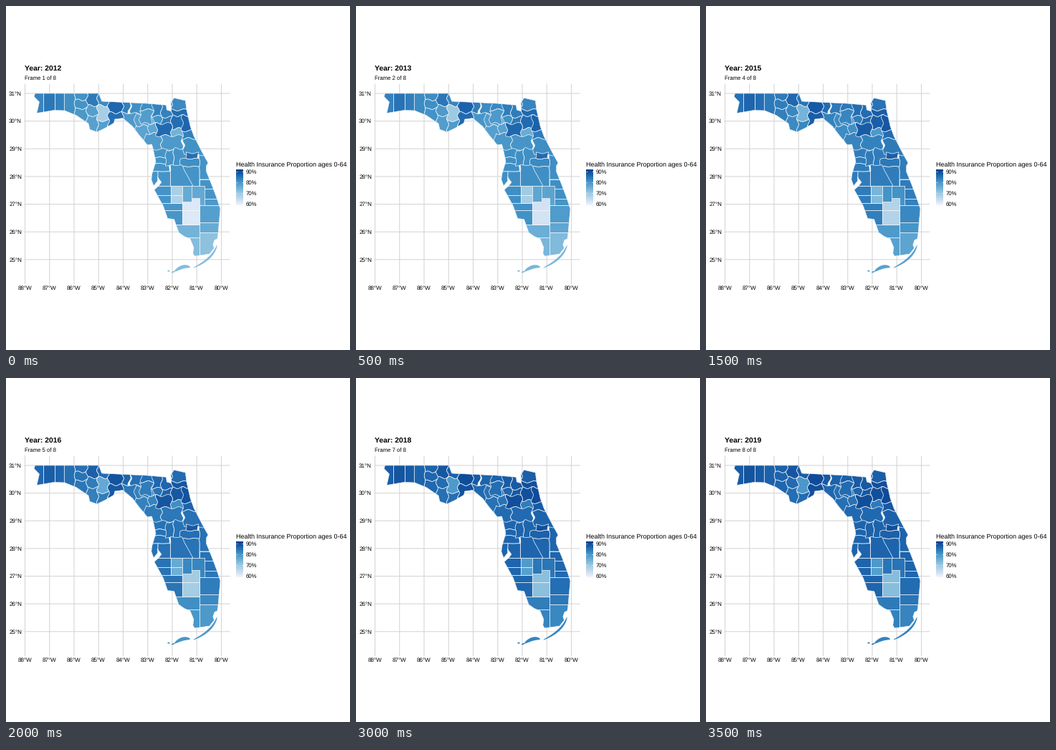
A matplotlib script for the animation above (4 s loop, 480 by 480 pixels).

```python
import numpy as np
import matplotlib.pyplot as plt
from matplotlib.animation import FuncAnimation
from matplotlib.colors import LinearSegmentedColormap, Normalize
from matplotlib.patches import Polygon
from matplotlib.path import Path

plt.rcParams["font.family"] = "Liberation Sans"
plt.rcParams["text.hinting"] = "none"

SIZE = 480
YEARS = range(2012, 2020)
EDGE = "#f4f8fc"
BLUES = LinearSegmentedColormap.from_list("blues", [
    "#eff3ff", "#c6dbef", "#9ecae1", "#6baed6", "#4292c6", "#2069b0", "#083d8d"])
NORM = Normalize(58.4, 91.4)

# Regional departures from the usual share: x, y, reach, percent
REGIONS = [
    (60, 140, 15, 4), (118, 128, 6, 4), (130, 160, 14, -4), (135, 150, 6, -13),
    (153, 146, 13, 10), (197, 170, 14, -5), (215, 142, 14, 3), (221, 172, 7, 6),
    (252, 160, 16, 7), (239, 180, 7, -9), (259, 209, 5, 5), (238, 263, 6, -18),
    (258, 285, 12, -24), (270, 335, 22, -12),
]

fig = plt.figure(figsize=(SIZE / 72, SIZE / 72), dpi=72, facecolor="white")
ax = fig.add_axes([0, 0, 1, 1])
ax.axis("off")
shapes = []


def points(*flat):
    return np.array(flat, float).reshape(-1, 2)


def lon_x(west):
    return 26.5 + 34.25 * (88 - west)


def lat_y(north):
    return 122 + 38.63 * (31 - north)


def label(x, y, text, size, **style):
    return ax.text(x, y, text, fontsize=size, va="baseline", **style)


def grid_line(x, y):
    ax.plot(x, y, color="#d3d3d3", lw=1, zorder=0, snap=False)


def first_share(x, y):
    return 80 + sum(gain * np.exp(-((x - cx) ** 2 + (y - cy) ** 2) / (2 * reach ** 2))
                    for cx, cy, reach, gain in REGIONS)


def add_area(corners, x, y, clip=True):
    patch = Polygon(corners, closed=True, ec=EDGE, lw=0.7 if clip else 0,
                    joinstyle="round", zorder=2 + 0.01 * len(shapes))
    ax.add_patch(patch)
    if clip:
        patch.set_clip_path(coast, ax.transData)
    start = first_share(x, y)
    shapes.append((patch, start, min(0.5 * (93 - start), 11)))


def meander(x, y):
    """River-like borders in the north, straight ones in the south and far west."""
    size = 1.4 * np.clip((235 - y) / 40, 0, 1) * np.clip((x - 85) / 20, 0, 1)
    return np.column_stack([x + size * np.sin(y / 2.4 + x / 9),
                            y + size * np.sin(x / 2.7 + y / 11)])


def stack(left, right, *cuts, lean=0):
    """Counties one below the other; later stacks cover earlier ones."""
    t = np.linspace(0, 1, 24)
    for top, bottom in zip(cuts, cuts[1:]):
        ring = points(left, top, right, top, right + lean, bottom, left, bottom, left, top)
        sides = [a + (b - a) * t[:, None] for a, b in zip(ring, ring[1:])]
        x, y = np.vstack(sides).T
        add_area(meander(x, y), (left + right) / 2, (top + bottom) / 2)


def island(start, bend, end, width):
    """Tapered ribbon along a quadratic curve."""
    t = np.linspace(0, 1, 30)[:, None]
    start, bend, end = map(np.array, (start, bend, end))
    mid = start * (1 - t) ** 2 + 2 * bend * t * (1 - t) + end * t ** 2
    along = np.gradient(mid, axis=0)
    side = along[:, ::-1] * [1, -1] / np.hypot(*along.T)[:, None]
    side = side * width / 2 * np.sin(np.pi * t) ** 0.5
    add_area(np.vstack([mid + side, (mid - side)[::-1]]), 250, 337, clip=False)


# Key points of the mainland, clockwise
north = points(
    40.5, 122, 129.5, 122, 133.7, 133, 197, 136, 223.5, 138.3, 224.3, 145, 230.8, 147,
    230, 135, 234.5, 128.3, 250.3, 132)
east = points(
    252, 145, 257.2, 168, 262.3, 182, 275, 206.5, 282, 219, 279.5, 223, 279.5, 231,
    287.3, 250, 294.2, 268.5, 299, 283, 296, 317, 294.8, 325, 291, 326.5, 288.8, 333,
    290.5, 338, 284, 346, 263.2, 349)
gulf = points(
    260.8, 345, 262, 337, 257, 325, 248.6, 321.4, 241, 316, 234.5, 297.5, 225.5, 296.5,
    219.5, 279.3, 207, 256.5, 213, 251, 217, 246, 211, 238, 212, 243.5, 206, 251,
    202.8, 242, 204, 233.5, 209, 217, 205.2, 199, 203.5, 193, 197, 193.5)
panhandle = points(
    187, 181.5, 176.7, 168, 163, 156.5, 151.7, 158, 150.5, 163.2, 139, 170, 127, 175.8,
    117, 172.3, 115, 164, 98, 152.5, 82, 146, 67, 145.4, 43, 149.5, 46.5, 134, 39.2, 126.5)
mainland = np.vstack([north, east, gulf, panhandle])
coast = Path(np.vstack([mainland, mainland[:1]]))

# Panhandle
for left, right in [(34, 52), (52, 67.6), (67.6, 81.3), (81.3, 96)]:
    stack(left, right, 118, 160)
stack(96, 113, 118, 131, 143, 172)
stack(113, 128, 118, 139, 153, 182)
stack(128, 143, 118, 139, 160, 182)
stack(143, 163, 118, 149, 168)
stack(163, 187, 149, 190)
stack(174, 190, 118, 150)
stack(163, 176, 118, 149, lean=-5)

# North
stack(189, 206, 118, 145, 165)
stack(180, 200, 151, 167, 198)
stack(187, 205, 145, 164, lean=-3)
stack(205, 217, 118, 154, 164)
stack(217, 231, 118, 155, 166)
stack(231, 262, 118, 145, 153)
stack(231, 250, 153, 171, 186)
stack(246, 270, 153, 174, 185)
stack(199, 210, 164, 178)
stack(194, 217, 178, 202)
stack(210, 231, 164, 181)
stack(217, 246, 181, 201)

# Centre
stack(198, 228, 200, 211.5, 220, 231)
stack(223, 234, 201, 223)
stack(234, 252, 199, 224)
stack(270, 305, 205, 242, 254.7, 268.6, 278, 302.4, 316.3, 352)
stack(248, 290, 185, 208)
stack(243, 270, 213, 224, 252)
stack(251, 268, 205, 213)
stack(198, 212, 231, 260)
stack(212, 229.6, 231, 251.3)

# South
stack(258, 277, 251, 278)
stack(198, 229.6, 251.3, 264, 275)
stack(198, 246.4, 275, 285, 305)
stack(229.6, 246.4, 251.3, 263.5, 275)
stack(229.6, 245, 222, 251.3, lean=16)
stack(230, 270, 304.5, 322.5, 352)
stack(246.4, 270, 268, 285, 304.5)
stack(246.4, 259, 251.3, 273)

island((294.5, 333.5), (289, 353), (261, 365.5), 2.8)
island((235, 370.5), (247, 361), (257, 364.5), 5)
island((225.3, 370), (227, 369.3), (228.7, 370), 2)
island((231, 372), (233, 371), (235.5, 370.2), 2)
ax.add_patch(Polygon(mainland, closed=True, fill=False, ec=EDGE, lw=0.5, zorder=4))

# Graticule and axis labels
for west in range(88, 79, -1):
    grid_line([lon_x(west)] * 2, [109, 387.5])
    label(lon_x(west) - 0.3, 395.8, f"{west}°W", 8, ha="center")
for lat in range(25, 32):
    grid_line([26, 312], [lat_y(lat)] * 2)
    label(22, lat_y(lat) + 2.7, f"{lat}°N", 8, ha="right")

# Legend
label(320.7, 224, "Health Insurance Proportion ages 0-64", 9)
ax.imshow(np.linspace(1, 0, 100)[:, None], cmap=BLUES, vmin=0, vmax=1, aspect="auto",
          extent=(321, 331, 278.3, 229), interpolation="bilinear")
for i, share in enumerate(range(90, 50, -10)):
    y = 231.4 + 14.8 * i
    for x in (321, 329):
        ax.plot([x, x + 2], [y, y], color="white", lw=0.6, zorder=3, solid_capstyle="butt")
    label(335, y + 2.9, f"{share}%", 7.8)

title = label(25.7, 91, "", 10.4, weight="bold")
subtitle = label(25.7, 103, "", 7.8)
ax.set_xlim(0, SIZE)
ax.set_ylim(SIZE, 0)


def draw(i):
    title.set_text(f"Year: {YEARS[i]}")
    subtitle.set_text(f"Frame {i + 1} of {len(YEARS)}")
    u = (i / (len(YEARS) - 1)) ** 0.8
    ease = u * u * (3 - 2 * u)
    for patch, start, gain in shapes:
        patch.set_facecolor(BLUES(NORM(start + gain * ease)))
    return []


anim = FuncAnimation(fig, draw, frames=len(YEARS), interval=500, repeat=True, repeat_delay=0)
plt.show()
```
